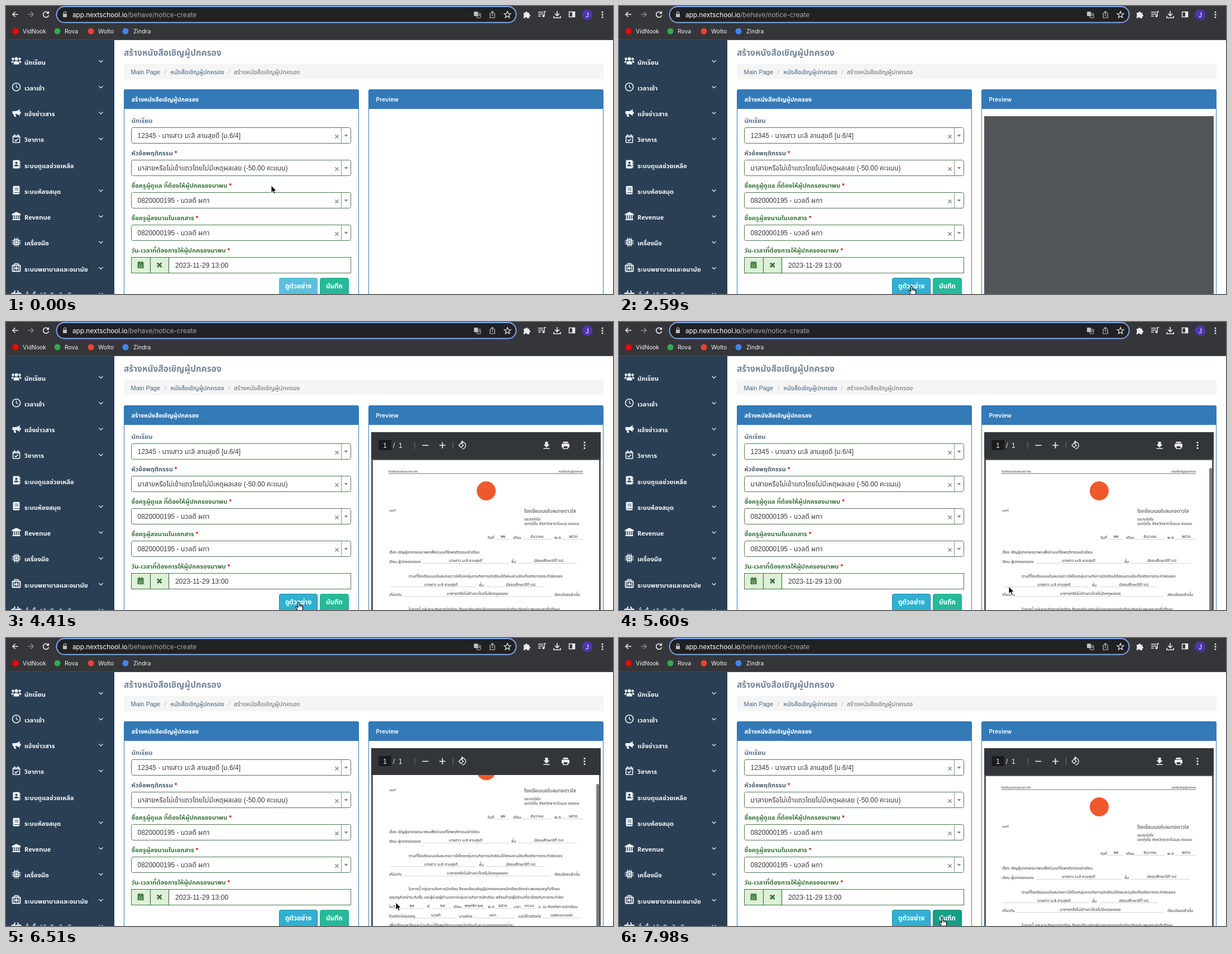
Recreate the animation shown at these times as an HTML page. Size 1087x515 px, loop 8000 ms.

```html
<!DOCTYPE html>
<html lang="th">
<head>
<meta charset="utf-8">
<title>Notice form</title>
<style>
html, body { margin: 0; width: 100%; height: 100%; overflow: hidden; background: #fff; }
svg { display: block; font-family: "Liberation Sans", Arial, sans-serif; }
text { white-space: pre; }
.th { font-family: "Noto Sans Thai Looped", "Noto Sans Thai", "Noto Sans", sans-serif; }
.side, .side .th { font-family: "Noto Sans Thai", "Noto Sans", sans-serif; }
.ui { font-family: Inter, Roboto, sans-serif; }
</style>
</head>
<body>
<svg id="stage" width="1087" height="515" viewBox="0 0 1087 515"></svg>
<script>
const LOOP = 8000, STEP = 70;
const student = 'นางสาว มะลิ ลานสุขดี', teacher = ['นวลดี', 'ผกา'];
const phone = '0820000195', school = 'โรงเรียนเมฆใบลมทอดาวใส';
const reason = 'มาสายหรือไม่เข้าแถวโดยไม่มีเหตุผลเลย';
const title = 'สร้างหนังสือเชิญผู้ปกครอง';

// Markup helpers. Thai runs are set slightly larger than Latin ones.
const rect = (x, y, w, h, fill, more = '') =>
  `<rect x="${x}" y="${y}" width="${w}" height="${h}" fill="${fill}" ${more}/>`;
const path = (d, stroke, width = 1.4, more = '') =>
  `<path d="${d}" fill="none" stroke="${stroke}" stroke-width="${width}" ${more}/>`;
const solid = (d, fill, more = '') => `<path d="${d}" fill="${fill}" ${more}/>`;
const circle = (x, y, r, fill, more = '') => `<circle cx="${x}" cy="${y}" r="${r}" fill="${fill}" ${more}/>`;
const at = (x, y, body, id = '') => `<g ${id && `id="${id}"`} transform="translate(${x} ${y})">${body}</g>`;
const text = (x, y, size, str, fill, more = '') => {
  const runs = str.replace(/[\u0e00-\u0e7f]+/g,
    s => `<tspan class="th" font-size="${(size * 1.02).toFixed(2)}">${s}</tspan>`);
  return `<text x="${x}" y="${y}" font-size="${size}" fill="${fill}" ${more}>${runs}</text>`;
};
const weight = n => `font-weight="${n}"`, mid = 'text-anchor="middle"';

function browserBar() {
  const c = '#e8eaed', g = '#bdc1c6';
  const marks = [[17, 30, '#f00', 'VidNook'], [92, 105, '#34a853', 'Rova'],
                 [152, 165, '#ea4335', 'Wolto'], [214, 228, '#4285f4', 'Zindra']];
  return rect(0, 0, 1087, 61, '#35363a') + rect(0, 60, 1087, 1, '#4a4c50') +
    rect(90.5, 1, 823, 28.5, '#202124', 'rx="14.2" stroke="#7fa7ee" stroke-width="2"') +
    path('M22 15H12M16.5 10.5L12 15L16.5 19.5', c, 1.6) +
    path('M39 15H49M44.5 10.5L49 15L44.5 19.5', '#84878b', 1.6) +
    path('M75.5 12A5 5 0 1 0 76.5 16.5', c, 1.6) + solid('M77 9V14H72Z', c) +
    rect(102, 14, 7, 6, g, 'rx="1"') + path('M103.5 14V12A2 2 0 0 1 107.5 12V14', g, 1.2) +
    `<text class="ui" x="119" y="19.5" font-size="11.75" fill="#fff">app.nextschool.io<tspan fill="#a5a9ae">/behave/notice-create</tspan></text>` +
    rect(838, 10, 7, 8, g, 'rx="1"') + rect(843, 13, 7, 8, 'none', `rx="1" stroke="${g}"`) +
    path('M844.5 16H849M845 19L848 15', g, 1) +
    path('M868.5 13H867V21H875V13H873.5M871 18V9.5M868.5 12L871 9.5L873.5 12', g, 1.2) +
    path('M898 9.5L899.5 13.5L904 13.7L900.5 16.5L901.7 20.8L898 18.3L894.3 20.8L895.5 16.5L892 13.7L896.5 13.5Z', c, 1.2) +
    solid('M927 12H930A2 2 0 0 1 934 12H937V15A2 2 0 0 1 937 19V22H933A2 2 0 0 0 929 22H927V18A2 2 0 0 0 927 15Z', c) +
    path('M953 11H962M953 14.5H962M953 18H958M964 18V10H967', c, 1.5) + circle(962.5, 18, 2, c) +
    path('M987 9V17M983 13.5L987 17.5L991 13.5M981 18V21H993V18', c, 1.7) +
    rect(1008.5, 10.5, 10, 9, 'none', `stroke="${c}" stroke-width="1.5"`) + rect(1014, 10, 5, 10, c) +
    circle(1041, 15.5, 9.5, '#5035b0') + text(1041, 19.5, 11, 'J', '#fff', mid) +
    [11, 15.5, 20].map(y => circle(1068, y, 1.5, c)).join('') +
    marks.map(([cx, x, color, s]) => circle(cx, 45, 5.5, color) +
      text(x, 48.6, 10.4, s, '#f1f3f4', 'class="ui"')).join('');
}

function sidebar() {
  const w = '#f4f7f9', b = '#2a3f54';
  const rows = [
    ['นักเรียน', circle(0, -4, 3, w) + circle(-6, -4, 2.2, w) + circle(6, -4, 2.2, w) +
      solid('M-5 6V3Q-5 0 0 0T5 3V6ZM-9 3Q-9 -1 -5 -1L-6 3ZM9 3Q9 -1 5 -1L6 3Z', w)],
    ['เวลาเช้า', circle(0, 0, 7, 'none', `stroke="${w}" stroke-width="1.6"`) + path('M0 -4V0L3 2', w)],
    ['แจ้งข่าวสาร', solid('M-7 -3H-2Q3 -3 6 -7V6Q3 2 -2 2L0 7H-4L-5 2H-7Z', w) + path('M7 -2V2', w, 2)],
    ['วิชาการ', rect(-6, -5, 12, 12, 'none', `rx="1" stroke="${w}" stroke-width="1.6"`) +
      path('M-3 -8V-5M3 -8V-5M-6 -3H6M-3 2L-1 4L3 0', w, 1.7)],
    ['ระบบดูแลช่วยเหลือ', rect(-6, -8, 12, 15, w, 'rx="1.5"') + circle(0, -3, 2, b) +
      solid('M-4 3Q-4 0 0 0T4 3Z', b) + path('M7 -5V-3M7 -1V1M7 3V5', w, 1.2)],
    ['ระบบห้องสมุด', rect(-6, -8, 12, 15, w, 'rx="2"') + path('M-3 -4H4M-3 -1H4M-4 4H6', b, 1.2)],
    ['Revenue', solid('M0 -8L8 -4V-2H-8V-4ZM-7 5H7V7H-7Z', w) + path('M-5 -2V5M-1.7 -2V5M1.7 -2V5M5 -2V5', w, 1.8)],
    ['เครื่องมือ', rect(-5, -5, 10, 10, w, 'rx="1"') +
      path('M-3 -8V8M0 -8V8M3 -8V8M-8 -3H8M-8 0H8M-8 3H8', w, 1.1) + rect(-2.5, -2.5, 5, 5, w, `stroke="${b}"`)],
    ['ระบบพยาบาลและอนามัย', rect(-7, -5, 14, 11, 'none', `rx="1" stroke="${w}" stroke-width="1.8"`) +
      path('M-3 -5V-8H3V-5', w) + path('M-4 -5V6M4 -5V6', w, 1.2) + path('M0 -3V4M-3 .5H3', w, 1.8)],
    ['สั่งซื้อ/บันทึกนักเรียน', path('M-8 -1H8L6 7H-6ZM-5 -1L-2 -6M5 -1L2 -6', w, 1.8)]
  ];
  return rect(0, 61, 194, 454, b) + rows.map(([name, icon], i) => {
    const y = 99.5 + i * 46.25;
    return at(18.5, y - 1, icon) + text(33, y + 5, 11, name, w, `class="side" ${weight(600)}`) +
      (i === 4 ? '' : path(`M166.5 ${y - 2.5}L170 ${y + 1}L173.5 ${y - 2.5}`, w, 1.1));
  }).join('');
}

function panel(x, name) {
  return rect(x + .5, 149.5, 420, 380, '#fff', 'rx="3" stroke="#337ab7"') +
    solid(`M${x} 184V152.5Q${x} 149 ${x + 3.5} 149H${x + 417.5}Q${x + 421} 149 ${x + 421} 152.5V184Z`, '#337ab7') +
    text(x + 13.5, 170.5, 10.5, name, '#fff', `${weight(600)} class="ui"`);
}

function form() {
  const green = '#3c763d', edge = '#4c784d', ink = '#3a3a3a';
  const fields = [
    [204, 'นักเรียน', `12345 - ${student} [ม.6/4]`, '#5a738e'],
    [262, 'หัวข้อพฤติกรรม', `${reason} (-50.00 คะแนน)`, '#4a5f73'],
    [320, 'ชื่อครูผู้ดูแล ที่ต้องให้ผู้ปกครองมาพบ', `${phone} - ${teacher.join(' ')}`, green],
    [378, 'ชื่อครูผู้ลงนามในเอกสาร', `${phone} - ${teacher.join(' ')}`, green]
  ];
  const label = (y, s, color, star) => text(224.5, y + 4.5, 11,
    s + (star ? ' <tspan fill="#e00000">*</tspan>' : ''), color, weight(700));
  return fields.map(([y, s, value, color], i) => label(y, s, color, i) +
    rect(224.5, y + 13.5, 393, 28, '#fff', `rx="3" stroke="${edge}"`) +
    path(`M600.5 ${y + 14}V${y + 41}`, '#7d9a7d', 1) +
    text(235.5, y + 32, 12, value, ink) +
    path(`M589.5 ${y + 26.5}L595.5 ${y + 32.5}M595.5 ${y + 26.5}L589.5 ${y + 32.5}`, '#888', 1.5) +
    solid(`M605.5 ${y + 26}H612.5L609 ${y + 30}Z`, '#888')).join('') +
    label(436, 'วัน-เวลาที่ต้องการให้ผู้ปกครองมาพบ', green, true) +
    rect(224.5, 449.5, 393, 28, '#fff', `stroke="${edge}"`) +
    rect(224.5, 449.5, 67, 28, '#dff0d8', `stroke="${green}"`) + path('M258.5 449V478M291.5 449V478', green, 1.2) +
    rect(235.5, 458, 11, 11, green) + path('M236 461.5H246M237 464.5H245M237 467H245M239 463V468M243 463V468', '#a9c8a0', .7) +
    path('M238.5 456V459M243.5 456V459', green, 1.7) +
    path('M271 459.5L278.5 467M278.5 459.5L271 467', green, 3) +
    text(303, 467.5, 12.2, '2023-11-29 13:00', ink);
}

const button = (id, x, w, s) => rect(x + .5, 486.5, w - 1, 32, '#fff', `rx="3" id="${id}"`) +
  text(x + w / 2, 505, 11.5, s, '#fff', `${mid} ${weight(600)}`);

function viewerBar() {
  const c = '#f1f1f1', dim = '#74777a';
  return rect(654, 197, 411, 48, '#323639') + rect(667.5, 211, 22.5, 18, '#191b1c') +
    text(678.5, 225, 12, '1', c, mid) + text(693, 225, 12, '/  1', c) +
    path('M732 214V227M800.5 214V227', dim, 1) + path('M745.5 220.5H756.5M776 220.5H787M781.5 215V226', c, 1.7) +
    path('M815 216.5L819 220.5L815 224.5L811 220.5ZM817 214.5A6.2 6.2 0 1 1 817 226.9', c, 1.4) +
    solid('M818 211.5V217.5L814.5 214.5Z', c) +
    solid('M965.5 214H970.5V219H973.5L968 224.5L962.5 219H965.5ZM962.5 225.5H973.5V227H962.5Z', c) +
    rect(997.5, 214, 9, 2.5, c) + rect(995, 217.5, 14, 7, c, 'rx="1.5"') +
    rect(998, 221.5, 8, 5, '#323639', `stroke="${c}" stroke-width="1.4"`) +
    [215.5, 220.5, 225.5].map(y => circle(1036, y, 1.6, c)).join('');
}

function letter() {
  const ink = '#333', size = 7;
  const line = (x, y, s, px = size, more = '') => text(x, y + 2.5, px, s, ink, more);
  const center = (x, y, s) => line(x, y - 1.5, s, size, mid);
  const dots = (y, ...spans) => spans.map(([a, b]) =>
    path(`M${a} ${y + 3.5}H${b}`, '#777', .7, 'stroke-dasharray="1 1.2"')).join('');
  const grade = 'มัธยมศึกษาปีที่ ๖/๔';
  return rect(657, 247, 405, 573, '#fff') +
    line(685, 266, school, 4.9, weight(500)) +
    line(1033, 266, 'หนังสือเชิญผู้ปกครอง', 4.9, `${weight(500)} text-anchor="end"`) +
    path('M685 271H1033', '#444', .8) + circle(860, 302, 17, '#f0592b') +
    line(686, 336, 'เลขที่', 5.8) + line(928, 338, school, 8.7) +
    line(928, 352, 'แขวงทุ่งใบ') + line(928, 360, 'เขตทุ่งใบ จังหวัดธาราใบเมฆ ๙๐๐๐๐') +
    line(862, 385, 'วันที่') + center(890, 385, '๒๒') + line(908, 385, 'เดือน') + center(951, 385, 'ธันวาคม') +
    line(982, 385, 'พ.ศ.') + center(1016, 385, '๒๕๖๖') + dots(385, [877, 903], [925, 977], [997, 1034]) +
    line(686, 411, 'เรื่อง เชิญผู้ปกครองมาพบเพื่อร่วมแก้ไขพฤติกรรมนักเรียน') +
    line(686, 428, 'เรียน ผู้ปกครองของ') + center(823, 428, student) + line(905, 428, 'ชั้น') + center(972, 428, grade) +
    dots(428, [747, 900], [917, 1022]) +
    line(721, 454, `ตามที่${school}โดยกลุ่มงานกิจการนักเรียนได้สอบสวนข้อเท็จจริงการกระทำผิดของ`) +
    center(779, 471, student) + line(847, 470, 'ชั้น') + center(922, 471, grade) + dots(470, [688, 842], [860, 965]) +
    line(686, 487, 'เกี่ยวกับ') + center(844, 487, reason) + line(982, 487, 'เรียบร้อยแล้วนั้น') + dots(487, [712, 976]) +
    line(721, 513, 'ในการนี้ กลุ่มงานกิจการนักเรียน จึงขอเรียนเชิญผู้ปกครองของนักเรียนดังกล่าวพบคุณครูที่ปรึกษา') +
    line(686, 528.5, 'คุณครูหัวหน้าระดับชั้น และผู้ช่วยผู้อำนวยการกลุ่มงานกิจการนักเรียน พร้อมด้วยผู้มีส่วนเกี่ยวข้องกับการกระทำผิด') +
    line(686, 545, 'ในวัน') + center(727, 545, 'พุธ') + line(754, 545, 'ที่') + center(782, 545, '๒๙') +
    line(801, 545, 'เดือน') + center(838, 545, 'พฤศจิกายน') + line(863, 545, 'พ.ศ.') + center(890, 545, '๒๕๖๖') +
    line(909, 545, 'เวลา') + center(937, 545, '๑๓:๐๐') + line(953, 545, 'น. ณ ห้องกิจการนักเรียน') +
    dots(545, [704, 750], [763, 797], [818, 860], [878, 905], [924, 949]) +
    line(686, 562, 'โดยติดต่อคุณครู') + center(770, 562, teacher[0]) + line(811, 562, 'นามสกุล') + center(872, 562, teacher[1]) +
    line(917, 562, 'เบอร์โทรติดต่อ') + center(995, 562, '๐๘๒๐๐๐๐๑๙๕') + dots(562, [735, 807], [837, 912], [961, 1030]) +
    line(686, 578, 'เพื่อปรึกษาหารือและร่วมกันแก้ไขพฤติกรรมของนักเรียนในความปกครองของท่าน') +
    line(721, 604, 'จึงเรียนมาเพื่อโปรดทราบ') + line(900, 634, 'ขอแสดงความนับถือ');
}

const stage = document.getElementById('stage');
stage.innerHTML = '<clipPath id="view"><rect x="654" y="245" width="411" height="270"/></clipPath>' +
  rect(0, 0, 1087, 515, '#fff') + browserBar() + sidebar() +
  text(211, 89, 15.2, title, '#73879c', `class="side" ${weight(600)}`) +
  rect(211, 103, 859, 28, '#f5f5f5') + text(223.5, 121.5, 11, 'Main Page', '#456580') +
  text(284, 121.5, 11, '/', '#bbb') + text(294.5, 121.5, 10.85, 'หนังสือเชิญผู้ปกครอง', '#3d5c78') +
  text(398, 121.5, 11, '/', '#bbb') + text(408, 121.5, 10.85, title, '#6a6a6a') +
  panel(211, title) + panel(649, 'Preview') + form() +
  button('look', 489, 69, 'ดูตัวอย่าง') + button('save', 562, 52, 'บันทึก') +
  rect(654, 197, 411, 318, '#525659', 'id="pane"') +
  `<g id="sheet" clip-path="url(#view)">${at(0, 0, letter(), 'page')}` +
  rect(1057, 261, 5, 300, '#7d7d7d', 'rx="2.5" id="thumb"') + '</g>' +
  `<g id="bar">${viewerBar()}</g>` +
  circle(524, 502, 26, 'none', 'id="ring" stroke="#111" stroke-width="1.5"') +
  at(0, 0, solid('M0 0V13L3 10.3L5 15L7.3 14L5.3 9.5H9.3Z', '#000', 'stroke="#fff"'), 'arrow') +
  at(0, 0, solid('M-1.3 1Q0 -1 1.3 1V5.5Q3 4.8 3.8 6.2Q5.3 5.5 6 7Q7.6 6.7 7.6 8.5V11Q7.3 13 6.5 15H-1.5Q-2.5 12.5 -5 9.5Q-5.2 7.5 -3.2 8L-1.3 9.5Z',
    '#fff', 'stroke="#000" stroke-width="1.1"') + path('M1.3 5.5V9M3.8 6.5V9M6 7.5V9.5', '#000', .8), 'hand');

const el = id => document.getElementById(id);
const [look, save, pane, sheet, page, thumb, bar, ring, arrow, hand] =
  ['look', 'save', 'pane', 'sheet', 'page', 'thumb', 'bar', 'ring', 'arrow', 'hand'].map(el);
const set = (node, attrs) => Object.entries(attrs).forEach(([k, v]) => node.setAttribute(k, v));
const show = (node, on) => { node.style.display = on ? '' : 'none'; };
const ease = (t, a, b) => {
  const p = Math.min(1, Math.max(0, (t - a) / (b - a)));
  return p * p * (3 - 2 * p);
};

// Pointer moves: start, end, target x, target y.
const moves = [[630, 1190, 588, 501], [1330, 1680, 524, 501], [4550, 5250, 698, 473], [6860, 7350, 579, 500]];

function draw(t) {
  let x = 475, y = 321;
  for (const [a, b, tx, ty] of moves) {
    const p = ease(t, a, b);
    x += (tx - x) * p;
    y += (ty - y) * p;
  }
  const over = (a, b) => y >= 486 && x >= a && x <= b;
  const onLook = over(489, 558), onSave = over(562, 614);
  const pressed = t >= 1890 && t < 2240, focused = t >= 1890;

  set(look, { fill: pressed ? '#2f8db8' : onLook || focused ? '#31b0d5' : '#5bc0de',
              stroke: focused ? '#1f7c9c' : onLook ? '#269abc' : '#46b8da' });
  set(save, { fill: onSave ? '#169f85' : '#26b99a', stroke: onSave ? '#128a73' : '#22ad90' });

  show(pane, t >= 2520);
  show(bar, t >= 2800);
  show(sheet, t >= 3290);
  const scroll = 150 * (ease(t, 5600, 5950) - ease(t, 6090, 6860));
  set(page, { transform: `translate(0 ${-scroll.toFixed(2)})` });
  set(thumb, { opacity: ease(t, 5460, 5600) - ease(t, 7070, 7350) });

  show(ring, t >= 1890 && t < 2240);
  set(ring, { r: 18 + 8 * ease(t, 1820, 1960), opacity: 1 - ease(t, 2030, 2240) });
  const pointing = onLook || onSave;
  show(hand, pointing);
  show(arrow, !pointing);
  set(pointing ? hand : arrow, { transform: `translate(${x.toFixed(2)} ${y.toFixed(2)})` });
}

const begin = performance.now();
function tick() {
  const t = Math.max(0, performance.now() - begin) % LOOP;
  draw(Math.floor(t / STEP) * STEP);
  requestAnimationFrame(tick);
}
tick();
</script>
</body>
</html>
```
